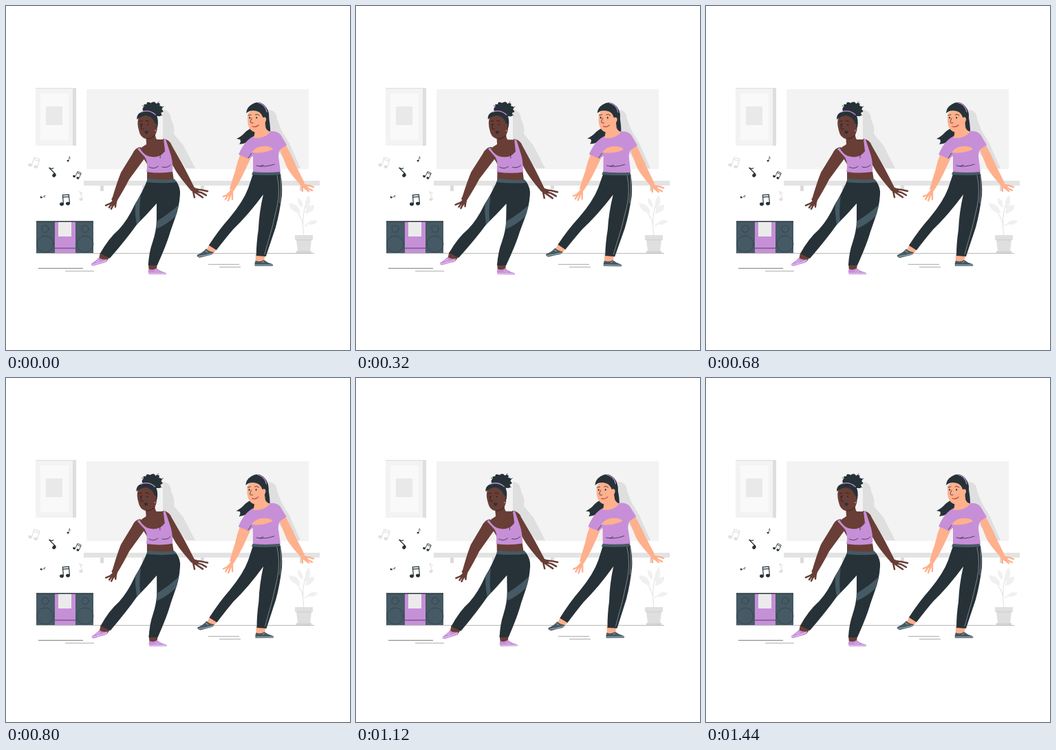
An HTML page for the animation above (1480 ms loop, 500 by 500 pixels).

```html
<!DOCTYPE html>
<html lang="en">
<head>
<meta charset="utf-8">
<title>Dance class</title>
<style>
html, body { margin: 0; width: 100%; height: 100%; overflow: hidden; background: #fff; }
svg { display: block; width: 100vw; height: 100vh; }
.dark { fill: #263238; }
.slate { fill: #455a64; }
.lilac { fill: #c78fd8; }
.brown { fill: #683e36; }
.peach { fill: #ffb08d; }
.line { fill: none; stroke: #263238; stroke-width: .8; stroke-linecap: round; stroke-linejoin: round; }
.limb { fill: none; stroke-linecap: round; stroke-linejoin: round; }
</style>
</head>
<body>
<svg viewBox="0 0 500 500">
  <rect width="500" height="500" fill="#fff"/>

  <g id="room">
    <path d="M97 120H102V203H97Z" fill="#dedede"/>
    <path d="M43 120H97V203H43Z" fill="#f3f3f3"/>
    <path d="M50 127H91V195H50Z" fill="#f9f9f9"/>
    <path d="M58 146H82V173H58Z" fill="#e9e9e9"/>
    <path d="M43 119.7H102" stroke="#ccc" stroke-width=".7"/>
    <path d="M117 121H440V237H117Z" fill="#f3f3f3"/>
    <path d="M228 151Q239 151 240 165Q246 176 244 186L258 203L275 236H262L228 195Z" fill="#dfdfdf"/>
    <path d="M381 151Q393 151 394 164L400 180L412 200L428 236H413L382 190Z" fill="#dfdfdf"/>
    <path d="M137 260h5v9h-5zM198 260h5v9h-5zM283 260h5v6h-5zM427 260h5v9h-5z" fill="#dcdcdc"/>
    <path d="M113 254H456V261H113Z" fill="#e3e3e3"/>
    <path d="M44 359.5H448" stroke="#a8a8a8" stroke-width=".8"/>
    <g stroke="#455a64" stroke-width=".8">
      <path d="M47 381.3H112"/>
      <path d="M86 385.3H128M294 375.5H339M310 379.5H341" stroke="#999"/>
    </g>
    <path d="M433 334Q428 305 439 278M432 318Q428 303 417 292M434 320Q441 313 447 312" fill="none" stroke="#e0e0e0"/>
    <path d="M436 296Q432 284 440 275Q446 286 436 296ZM428 301Q414 300 411 287Q425 286 428 301ZM435 302Q436 289 448 289Q449 299 435 302ZM438 317Q442 309 453 312Q449 320 438 317ZM431 293Q423 289 424 279Q433 282 431 293Z" fill="#f0f0f0"/>
    <path d="M420 333H446V340H444L442 356H424L422 340H420Z" fill="#dfdfdf"/>
    <path d="M422 340H444" stroke="#ccc"/>
    <path d="M422 356H444V359H422Z" fill="#d6d6d6"/>
  </g>

  <g id="stereo">
    <path d="M44 313H127V359H44Z" class="slate"/>
    <path d="M71 313H101V359H71Z" class="lilac"/>
    <path d="M44 312.5H127V314H44Z" class="dark"/>
    <path d="M76 314H95V335H76Z" fill="#ebebeb"/>
    <path d="M71 352H101" class="line" stroke-width=".6"/>
    <g class="line" id="cones" style="stroke-width:.5"></g>
  </g>

  <g id="notes"></g>

  <g id="left">
    <path class="brown" d="M137 359L151 365L146 372L135 369ZM207 374H220L219 384H208Z"/>
    <path class="lilac" d="M124 375Q129 372 135 366Q141 370 147 368Q147 373 141 374L127 378Q123 378 124 375Z"/>
    <path class="line" d="M124 376.5Q134 375 146 370M133 369l3 2M131 371l3 2" style="stroke:#fff;stroke-width:.6"/>
    <path class="lilac" d="M208 382Q213 385 219 381Q225 386 231 387Q234 388 233 390H208Q206 386 208 382Z"/>
    <path class="line" d="M208 388.5H232M219 384l-2 2M222 385l-2 2" style="stroke:#fff;stroke-width:.6"/>

    <path class="brown" d="M196 205Q188 205 183 216L167 242Q161 257 154 281L161 284Q172 266 179 252L201 222Z"/>
    <g class="limb" stroke="#683e36" stroke-width="2.5">
      <path d="M158 282L152 287L145 290M156 285L150 293M158 285L153 295M160 283L159 292"/>
      <path d="M156 281L159 284L156 288" stroke-width="5"/>
    </g>
    <path class="brown" d="M228 193Q238 194 241 203L258 233Q266 248 274 264L268 267Q254 251 247 240L233 215Z"/>
    <g class="limb" stroke="#683e36" stroke-width="2.5">
      <path d="M273 266L284 267L293 269M275 269L284 271L291 275M274 270L286 278M272 269L274 278"/>
      <path d="M271 266L277 268" stroke-width="6"/>
    </g>

    <path class="brown" d="M203 188L217 182Q216 190 219 194L233 194Q240 204 240 217L242 240L244 254H205V230L193 210Q198 204 204 201Z"/>
    <path class="lilac" d="M191 208L194 206Q199 215 206 218Q222 223 231 211L229 194H232L238 212Q243 225 242 241Q224 244 204 241Q207 229 202 220Z"/>
    <path class="line" d="M208 234Q215 238 221 233M227 234Q234 236 239 231M224 215V221" stroke-width=".6"/>

    <path class="dark" d="M205 254L247 254Q254 264 253 274Q252 292 246 308L239 328Q234 346 220 377H207Q208 358 213 344Q219 326 219 311L219 287Q205 303 190 318Q176 338 151 367L137 360Q149 338 164 325Q177 311 187 289Q197 273 205 254Z"/>
    <path class="slate" d="M206 250.5Q226 254 245 251.5L248 256Q228 258.500 204 256Z"/>
    <path class="slate" d="M196 275Q193 297 195 312L190 318Q187 300 188 287Z"/>
    <path class="slate" d="M251 289Q236 303 219 313V324Q235 317 247 305Z"/>

    <path class="dark" d="M200 154Q196 149 201 146Q198 142 204 143Q204 138 210 141Q216 137 218 142Q225 139 223 145Q230 146 226 150Q231 154 225 155Q228 161 221 160L213 160Z"/>
    <path class="line" d="M203 148L198 145M218 143l4 -4M225 148l4 -2M223 156l4 3" stroke-width="1.4"/>
    <path class="brown" d="M192 164Q195 155 208 156Q219 158 219 171Q221 179 217 187Q211 194 203 193Q195 191 193 181Q190 171 192 164Z"/>
    <path class="dark" d="M190 165Q189 157 197 154Q210 150 218 158Q222 165 220 176L217 178Q217 171 215 167Q211 160 203 159Q196 160 190 165Z"/>
    <path class="brown" d="M214 171Q219 169 219 174Q218 180 214 179Z"/>
    <path d="M197 154Q208 150 217 158" class="limb" stroke="#c78fd8" stroke-width="1.3"/>
    <path class="line" d="M194 168l4-1M203 167q3-1 5 1M198 171Q195 178 197 179L200 179M205 193Q212 193 216 188" style="stroke:#2a1a18"/>
    <path class="dark" d="M196 171a1 1.4 0 1 0 .1 0ZM206 171a1 1.4 0 1 0 .1 0ZM201 182q3-1 6 0q-1 4-4 4Z"/>
    <circle cx="217" cy="181" r=".9" class="lilac"/>
  </g>

  <g id="right">
    <path class="peach" d="M296 346L307 353L300 362L290 358ZM363 361H377L375 373H363Z"/>
    <path class="slate" d="M278 362Q286 359 291 353Q295 357 302 358Q301 362 294 363L282 366Q277 365 278 362Z"/>
    <path class="slate" d="M363 370Q369 373 375 369Q380 373 387 375Q390 377 387 378H362Q361 374 363 370Z"/>
    <path class="line" d="M280 364Q290 363 300 360M363 376.5H387M290 356l3 2M375 371l-2 2" style="stroke:#fff;stroke-width:.6"/>

    <path class="dark" d="M374 144Q383 151 382 163Q384 174 384 182L368 187L360 190Q352 200 339 201Q342 197 340 194L335 193Q343 189 347 184Q352 179 360 176Z"/>
    <path class="peach" d="M341 214L356 220Q348 238 343 248Q337 260 331 269L325 266Q329 252 333 240Q336 226 341 214Z"/>
    <g class="limb" stroke="#ffb08d" stroke-width="2.4">
      <path d="M326 270L321 275L316 277M325 272L319 281M327 273L323 283M329 272L329 281"/>
      <path d="M328 269L325 274" stroke-width="5"/>
    </g>
    <path class="peach" d="M396 204L406 201Q416 219 421 231Q428 245 434 257L428 260Q414 245 408 234Z"/>
    <g class="limb" stroke="#ffb08d" stroke-width="2.4">
      <path d="M432 260L441 261L447 263M433 262L445 268M431 262L440 269M430 261L431 269"/>
      <path d="M430 259L436 262" stroke-width="5"/>
    </g>

    <path class="dark" d="M359 244H399Q402 260 401 275Q398 300 392 322L378 364L364 363Q364 345 367 325Q368 300 374 274Q352 304 330 325Q319 338 306 355L295 348Q309 326 325 308Q345 284 352 265Z"/>
    <path class="line" d="M394 246Q399 268 394 292L387 322L376 361M399 247Q401 266 398 286" style="stroke:#b4babd;stroke-width:.6"/>
    <path class="slate" d="M359 240.500H398L399 245Q379 247 357 245Z"/>
    <path class="lilac" d="M360 189Q369 195 383 182Q394 181 399 187L408 202L399 208Q396 211 396 219L399 241Q379 243 359 241L359 218L353 222L338 216Q346 196 360 189Z"/>
    <path class="peach" d="M357 213Q364 202 380 204Q386 205 388 208Q376 215 357 213Z"/>
    <path class="line" d="M364 232Q376 235 390 230M369 233l5-2M352 221l5-7" stroke-width=".6"/>

    <path class="peach" d="M362 180L377 172Q376 180 384 183Q376 193 360 192Z"/>
    <path class="peach" d="M351 158Q355 149 367 151Q377 155 377 166Q377 177 371 182Q365 186 358 182Q352 178 351 168Z"/>
    <path class="dark" d="M349 156Q349 148 357 143Q368 136 377 146Q383 153 382 165L377 172Q377 164 373 162Q371 155 365 153Q355 150 349 156Z"/>
    <path class="peach" d="M373 162Q378 160 378 165Q377 171 373 169Z"/>
    <path d="M366 140.500Q377 143 379 154" class="limb" stroke="#c78fd8" stroke-width="1.2"/>
    <path class="line" d="M352 159l4-1M362 158q3-2 6 1M357 163Q354 169 356 170L359 170"/>
    <path class="dark" d="M354 161a1 1.4 0 1 0 .1 0ZM364 161a1 1.4 0 1 0 .1 0Z"/>
    <path class="limb" d="M358 175Q363 177 367 173" stroke="#b84a45" stroke-width="1.2"/>
  </g>
</svg>
<script>
const LOOP = 1480, STEP = 40, SWAY = 1, LEAD = 50;
const byId = id => document.getElementById(id);

const ring = (x, y, r) => `<circle cx="${x}" cy="${y}" r="${r}"/>`;
byId('cones').innerHTML = [57, 115].map(x =>
  ring(x, 324, 5) + ring(x, 346, 12)).join('');

// One or two heads; x, y is the first head.
function note(x, y, size, turn, color, pair) {
  const head = cx => `<ellipse cx="${cx}" rx="3" ry="2.4" fill="${color}"/>`;
  const shape = pair
    ? head(0) + head(9) + `<path d="M2.5 0V-13H11.5V0M2.5 -10H11.5" fill="none" stroke="${color}" stroke-width="1.2"/>`
    : head(0) + `<path d="M2.5 0V-13Q4 -8 7 -8" fill="none" stroke="${color}" stroke-width="1.2"/>`;
  return `<g transform="translate(${x} ${y}) rotate(${turn}) scale(${size})">${shape}</g>`;
}
const ink = '#263238', pale = '#e0e0e0';
byId('notes').innerHTML =
  note(81, 288, 1, -5, ink, true) +
  note(70, 246, 1, -45, ink, false) +
  note(99, 247.5, .65, 25, ink, true) +
  note(90, 225, .5, 8, ink, false) +
  note(51, 278, .5, 55, ink, false) +
  note(35, 231, .95, 18, pale, true) +
  note(109, 281, .9, -22, pale, false);

const dancers = [['left', 208, 264], ['right', 363, 259]]
  .map(([id, x, y]) => ({ el: byId(id), x, y }));

// Steady swing 0, 1, 0, -1, 0 over one turn.
function swing(turn) {
  const p = (turn + .25) % 1;
  return 1 - 4 * Math.abs(p - .5);
}

function draw(ms) {
  const t = Math.floor((ms % LOOP) / STEP) * STEP;
  const angle = SWAY * swing((t + LEAD) / LOOP);
  for (const { el, x, y } of dancers)
    el.setAttribute('transform', `rotate(${angle.toFixed(4)} ${x} ${y})`);
}

const start = performance.now();
function tick() {
  draw(performance.now() - start);
  requestAnimationFrame(tick);
}
tick();
</script>
</body>
</html>
```
